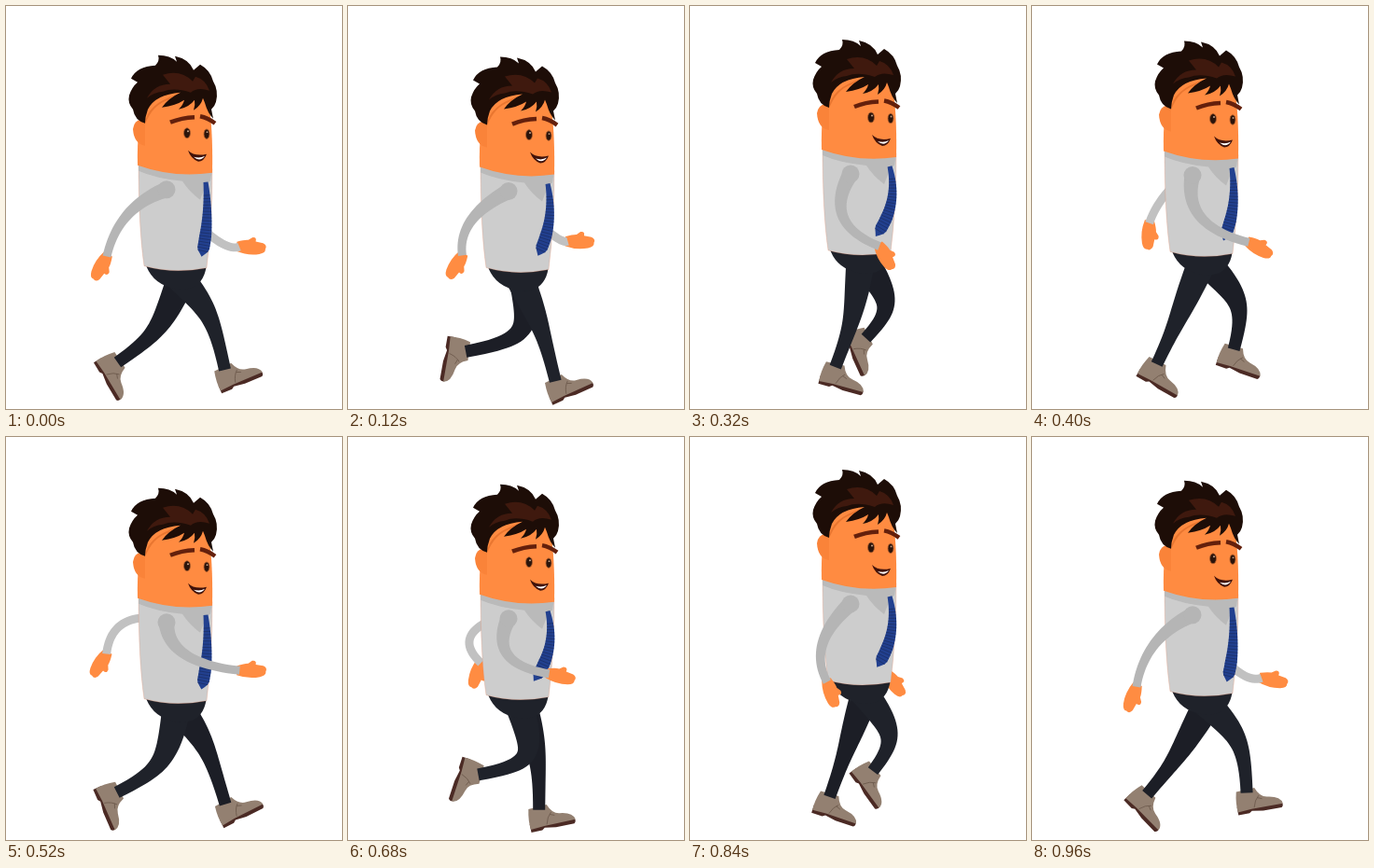
These frames come from a looping animation (360x432 px, 1000 ms). An HTML page:

```html
<!DOCTYPE html>
<html lang="en">
<head>
<meta charset="utf-8">
<title>Walking man</title>
<style>
html, body { margin: 0; width: 100%; height: 100%; overflow: hidden; background: #fff; }
svg { display: block; width: 360px; height: 432px; }
</style>
</head>
<body>
<svg viewBox="0 0 360 432">
  <defs>
    <g id="shoe">
      <path fill="#4b2a24" d="M-13 13 L-13 22 L-1 22 L2 20 L14 22 L34 22 Q37 20 35 16 Z"/>
      <path fill="#938071" d="M-11 -3 L9 -4 Q13 7 21 8 Q35 10 36 18 L2 18 L-13 19 Q-14 9 -11 -3 Z"/>
      <path fill="none" stroke="#6d5a4d" stroke-width=".8" d="M5 17 Q7 9 12 5 M10 7 L15 9"/>
    </g>
    <path id="hand" fill="#ff8c42" d="M-3 -5 Q5 -8 9 -8 L13 -11 Q18 -12 17 -7 L25 -6 Q30 -4 28 0 Q29 4 22 6 Q10 9 -3 5 Z"/>
  </defs>

  <use id="farHand" href="#hand"/>
  <path id="farArm" fill="#c1c1c1"/>
  <use id="farShoe" href="#shoe"/>
  <path id="farLeg" fill="#1c1e26"/>
  <use id="nearShoe" href="#shoe"/>
  <path id="nearLeg" fill="#1f222a"/>

  <g id="body">
    <path fill="#1f222a" d="M149 276 L215 276 Q214 296 200 303 Q188 307 176 303 Q155 297 149 276 Z"/>
    <path fill="#cdcdcd" stroke="#ea7b55" stroke-opacity=".35" stroke-width=".7"
      d="M142 168 L221 176 Q221 235 215 282 Q180 289 148 280 Q142 240 142 168 Z"/>
    <path fill="#bababa" d="M142 168 L221 176 L219 189 L215 191 L208 209 Q196 200 189 189 Q160 186 142 178 Z"/>
    <path fill="#ff8b41" d="M148 104 Q170 84 216 96 Q222 130 221 180 Q180 186 141 172 Q140 130 148 104 Z"/>
    <path fill="#fa8339" d="M149 124 Q138 121 136 133 Q137 149 149 151 Z"/>
    <path fill="#e97630" d="M149 128 Q150 106 186 95 Q178 98 174 102 Q157 107 149 128 Z"/>
    <path fill="#1d0d07" d="M149 127 Q138 124 136 112 Q130 105 132 97 Q135 88 141 83 L134 79
      Q140 66 160 65 Q165 60 163 54 Q176 54 183 61 L181 55 Q196 58 201 70 L208 64
      Q219 70 222 82 Q228 92 225 104 Q224 108 220 112 L222 122 Q216 116 213 105 L211 100
      Q209 108 201 113 Q203 107 202 102 Q196 110 185 112 Q190 107 191 102 Q182 108 167 110
      Q174 100 187 94 Q160 96 152 112 Q149 120 149 127 Z"/>
    <path fill="#3f190e" d="M151 100 Q159 85 176 85 L168 75 Q187 69 200 82 L203 77 Q214 80 218 92
      Q205 88 198 94 Q180 88 168 93 Q158 94 151 100 Z"/>
    <g fill="none" stroke="#64200c" stroke-width="4.5">
      <path d="M176 126 Q188 121 202 120.500"/>
      <path d="M208 119.500 Q216 121 224 127"/>
    </g>
    <g fill="#2b140b" stroke="#b25f2e" stroke-width=".8">
      <ellipse cx="194" cy="137.500" rx="3.500" ry="5.500"/>
      <ellipse cx="215" cy="138.500" rx="3" ry="5.200"/>
    </g>
    <g fill="#c9a58c">
      <circle cx="195" cy="135.500" r="1"/>
      <circle cx="215.500" cy="136.500" r=".9"/>
    </g>
    <path fill="#40120a" d="M195 156 Q202 163 215 160 Q212 168 206 168 Q198 165 195 156 Z"/>
    <path fill="#fff" d="M201 163 Q208 165 213 162 Q208 169 201 163 Z"/>
  </g>

  <path id="tie" fill="#22408f"/>
  <path id="stripes" fill="none" stroke="#16244f" stroke-opacity=".5" stroke-width="1"/>
  <use id="nearHand" href="#hand"/>
  <path id="nearArm" fill="#b5b5b5"/>
  <circle id="shoulder" cx="172" r="9.500" fill="#b5b5b5"/>
</svg>
<script>
const LOOP = 1000, STEP = 40;
const el = {};
document.querySelectorAll('svg > [id]').forEach(n => el[n.id] = n);

// Mean plus harmonics, each given as a cosine and a sine amount
const wave = (phase, mean, ...amounts) => amounts.reduce((sum, a, i) => {
  const angle = phase * (1 + (i >> 1));
  return sum + a * (i % 2 ? Math.sin(angle) : Math.cos(angle));
}, mean);

// Both legs share one stride; phase 0 is the heel strike
const leg = p => ({
  mid: [wave(p, 192, 28, -8, -3, 3, 0, -5), wave(p, 336, -7, 4, 3, 10)],
  end: [wave(p, 174, 57.5, 9, 3), wave(p, 380, 4, 19, 6, 6)],
  angle: wave(p, 34, -41, -47, -16, 5)
});
const handX = p => wave(p, 179, -71, -7);
const handAngle = p => wave(p, 63, 58, 26);
const nearArm = p => ({
  mid: [wave(p, 157, -31, -4, 4), wave(p, 228, -4, 0, 0, 5)],
  end: [handX(p), wave(p, 259.5, 9, 2)],
  angle: handAngle(p)
});
const farArm = p => ({
  mid: [wave(p, 168, -46, -15, 5), wave(p, 223, -23)],
  end: [handX(p), wave(p, 245, -13, 3)],
  angle: handAngle(p)
});

// Both edges of a band from start to end through mid; a higher weight bends it more sharply
function band(start, mid, end, weight, width) {
  const bend = mid.map((m, i) => m * (1 + weight) / weight - (start[i] + end[i]) / (2 * weight));
  const point = t => {
    const a = (1 - t) ** 2, b = 2 * weight * t * (1 - t), c = t * t;
    return start.map((s, i) => (a * s + b * bend[i] + c * end[i]) / (a + b + c));
  };
  const left = [], right = [], n = 24;
  for (let i = 0; i <= n; i++) {
    const t = i / n, [x, y] = point(t);
    const [x0, y0] = point(t - 0.01), [x1, y1] = point(t + 0.01);
    const k = width(t) / 2 / Math.hypot(x1 - x0, y1 - y0);
    const nx = (y1 - y0) * k, ny = (x1 - x0) * k;
    left.push([(x + nx).toFixed(2), (y - ny).toFixed(2)]);
    right.push([(x - nx).toFixed(2), (y + ny).toFixed(2)]);
  }
  return { left, right };
}

const outline = b => 'M' + [...b.left, ...[...b.right].reverse()].join('L') + 'Z';

function limb(name, tip, start, { mid, end, angle }, weight, width) {
  el[name].setAttribute('d', outline(band(start, mid, end, weight, width)));
  el[tip].setAttribute('transform', `translate(${end}) rotate(${angle})`);
}

const legWidth = t => 13 + 18 * (1 - t) ** 1.5;
const armWidth = t => 9 + 8 * (1 - t) ** 2;
const thinArm = () => 9;
const tieWidth = t => (5 + 8 * Math.min(1, t * 1.4)) * Math.min(1, (1 - t) / 0.1);

function draw(t) {
  const near = 2 * Math.PI * t / LOOP, far = near + Math.PI, beat = 2 * near;
  const dy = wave(beat, -7.5, 4.5, 9.5, 1.7);
  el.body.setAttribute('transform', `translate(0 ${dy})`);
  el.shoulder.setAttribute('cy', 198 + dy);
  limb('farArm', 'farHand', [168, 194 + dy], farArm(far), 1, thinArm);
  limb('farLeg', 'farShoe', [188, 293 + dy], leg(far), 2, legWidth);
  limb('nearLeg', 'nearShoe', [183, 289 + dy], leg(near), 2, legWidth);
  limb('nearArm', 'nearHand', [172, 198 + dy], nearArm(near), 1, armWidth);

  const top = 190 + dy, swing = wave(beat, -11, 6.5), drop = wave(beat, 77, 3);
  const tie = band([214, top], [215 - swing * 0.03, top + drop * 0.52], [214 + swing, top + drop], 1, tieWidth);
  el.stripes.setAttribute('d', tie.left.map((p, i) => i > 3 && i < 23 ? `M${p}L${tie.right[i]}` : '').join(''));
  el.tie.setAttribute('d', outline(tie));
}

const start = performance.now();
function tick() {
  const t = Math.max(0, performance.now() - start) % LOOP;
  draw(Math.floor(t / STEP) * STEP);
  requestAnimationFrame(tick);
}
draw(0);
requestAnimationFrame(tick);
</script>
</body>
</html>
```
